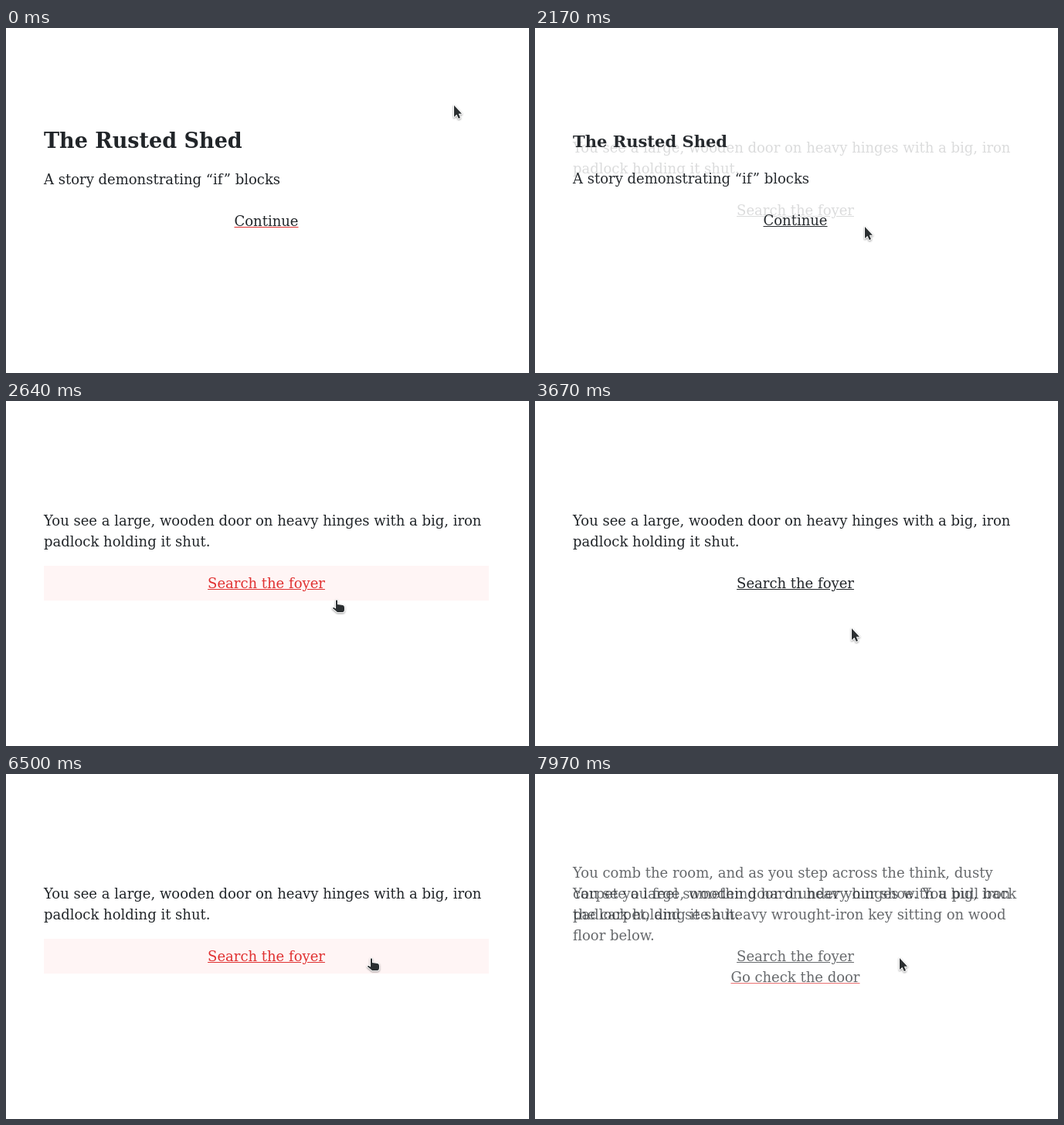
An HTML page that plays this animation: 677x446 px, repeating every 8 s.

```html
<!DOCTYPE html>
<html lang="en">
<head>
<meta charset="utf-8">
<title>Story</title>
<style>
html, body { margin: 0; width: 100%; height: 100%; overflow: hidden; background: #fff; }
body { position: relative; font: 18px/27px "DejaVu Serif", serif; color: #212529; cursor: default; }
.page { position: absolute; left: 49px; top: 0; width: 576px; white-space: pre; }
.page > * { position: absolute; left: 0; width: 100%; margin: 0; }
h1 { top: 127px; font-size: 27px; line-height: 37px; }
.link { padding: 9px 0; text-align: center; }
.link span { text-decoration: underline; text-decoration-color: currentColor; }
.red span { text-decoration-color: #e03131; }
.hover .link { background: #fff5f5; color: #e03131; }
.old { margin-top: -1px; }
.old h1 { top: 132px; font-size: 21.06px; line-height: 32px; }
.old .link span { text-decoration-color: currentColor; }
svg { position: absolute; left: 0; top: 0; overflow: visible; filter: drop-shadow(0 1px 1px rgba(0,0,0,.4)); }
svg path { fill: #2b2f31; stroke: #fff; stroke-width: 2; paint-order: stroke; stroke-linejoin: round; }
</style>
</head>
<body>
<div class="page" id="intro">
  <h1>The Rusted Shed</h1>
  <p style="top:182px">A story demonstrating “if” blocks</p>
  <div class="link red" style="top:227px"><span>Continue</span></div>
</div>
<div class="page" id="door">
  <p style="top:141px">You see a large, wooden door on heavy hinges with a big, iron
padlock holding it shut.</p>
  <div class="link" style="top:213px"><span>Search the foyer</span></div>
</div>
<div class="page" id="foyer">
  <p style="top:114px">You comb the room, and as you step across the think, dusty
carpet you feel something hard under your shoe. You pull back
the carpet, and see a heavy wrought-iron key sitting on wood
floor below.</p>
  <div class="link red" style="top:240px"><span>Go check the door</span></div>
</div>
<svg id="cursor" width="1" height="1">
  <path id="arrow" d="M0 0V15L3.4 11.8L5.8 17L8 16L5.8 10.8H10Z"/>
  <path id="hand" d="M0 1Q1 -.5 2 1V6L9 7Q11 7.5 11 10V13Q11 15.5 9 16H2L-4 11Q-4 9.5 -2.5 10L0 11.5Z"/>
</svg>
<script>
const LOOP = 8000, FADE = 500, POWER = 1.67;
const $ = id => document.getElementById(id);
const intro = $('intro'), door = $('door'), foyer = $('foyer');

// Pointer moves: start, end, from x, y, to x, y
const moves = [
  [500, 1040, 580, 100, 366, 257],
  [1270, 1440, 366, 257, 427, 257],
  [3340, 3670, 427, 257, 410, 294],
  [6100, 6500, 410, 293, 472, 238]
];

const clamp = v => Math.max(0, Math.min(1, v));
const smooth = p => p * p * (3 - 2 * p);

function pointer(t) {
  const [start, end, x0, y0, x1, y1] = moves.filter(m => t >= m[0]).pop() || moves[0];
  const p = smooth(clamp((t - start) / (end - start)));
  return [Math.round(x0 + (x1 - x0) * p), Math.round(y0 + (y1 - y0) * p)];
}

function show(page, fadeIn, fadeOut, hover) {
  const shown = 1 - (1 - fadeIn) ** POWER, left = 1 - fadeOut ** POWER;
  page.style.opacity = shown * left;
  page.classList.toggle('hover', hover);
}

function draw(t) {
  const [x, y] = pointer(t);
  const progress = start => t < start + 40 ? 0 : clamp((t - start - 20) / FADE);
  const first = progress(2100), second = progress(7700);
  const overIntro = t < 2140 && y >= 227 && y < 272;
  const overDoor = t >= 2640 && t < 7740 && y >= 213 && y < 258;

  show(intro, 1, first, overIntro);
  intro.classList.toggle('old', first > 0);
  show(door, first, second, overDoor);
  show(foyer, second, 0, false);

  const clicked = t >= 2100 && t < 2640 || t >= 7700;
  const pointing = (overIntro || overDoor) && !clicked;
  $('hand').style.display = pointing ? '' : 'none';
  $('arrow').style.display = pointing ? 'none' : '';
  $('cursor').style.transform = `translate(${x}px, ${y}px)`;
}

const begin = performance.now();
function tick() {
  draw((performance.now() - begin) % LOOP);
  requestAnimationFrame(tick);
}
tick();
</script>
</body>
</html>
```
